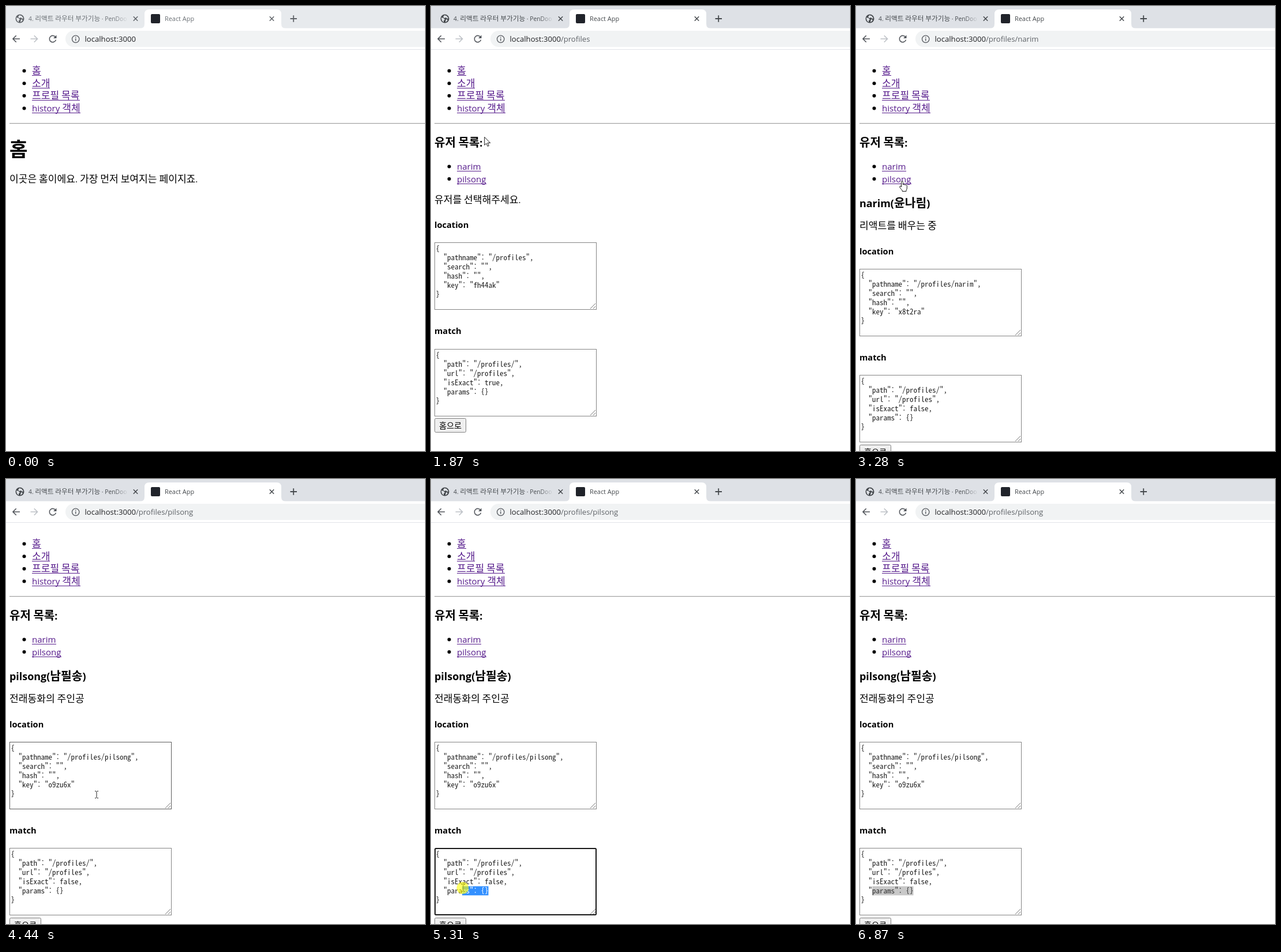
An HTML page for the animation above (6.95 s loop, 726 px wide and 772 px high).

```html
<!DOCTYPE html>
<html lang="ko">
<head>
<meta charset="utf-8">
<title>React App</title>
<style>
  html, body { margin: 0; width: 100%; height: 100%; overflow: hidden; background: #fff; }
  svg { display: block; width: 100%; height: 100%; }
  text { font-family: "Open Sans", "Noto Sans CJK KR", "Noto Sans", sans-serif; white-space: pre; }
  .mono { font-family: "Noto Sans Mono CJK KR", "Noto Sans Mono", "Liberation Mono", monospace; }
  .line { fill: none; }
</style>
</head>
<body>
<svg id="stage" viewBox="0 0 726 772" xmlns="http://www.w3.org/2000/svg">
  <g id="frame"></g>
  <g id="page"></g>
  <g id="pointer"></g>
</svg>
<script>
const LOOP = 6950;
const SANS = '"Open Sans", "Noto Sans CJK KR", "Noto Sans", sans-serif';
const MONO = '"Noto Sans Mono CJK KR", "Noto Sans Mono", "Liberation Mono", monospace';
const LATIN = 0.88;         // Latin letters run smaller than Hangul
const CELL = 6.5, ROW = 15.8;
const VISITED = '#551a8b';

const ruler = document.createElement('canvas').getContext('2d');
function measure(str, size, family) {
  ruler.font = `${size}px ${family}`;
  return ruler.measureText(str).width;
}
const monoSize = 13 * CELL / measure('0', 13, MONO);

// --- drawing helpers -------------------------------------------------
const runs = (str, size) => str.split(/([\uac00-\ud7a3]+)/).filter(Boolean).map(s => {
  const hangul = /[\uac00-\ud7a3]/.test(s);
  return { s, hangul, size: hangul ? size : size * LATIN };
});
const widthOf = (str, size) =>
  runs(str, size).reduce((sum, r) => sum + measure(r.s, r.size, SANS), 0);

function text(x, y, str, size = 17.1, fill = '#000', weight = 400) {
  // regular Hangul is drawn a little lighter than the Latin beside it
  const spans = runs(str, size).map(r => {
    const w = r.hangul && weight === 400 ? 350 : weight;
    return `<tspan font-size="${r.size}" font-weight="${w}">${r.s}</tspan>`;
  }).join('');
  return `<text x="${x}" y="${y}" fill="${fill}">${spans}</text>`;
}
const bold = (x, y, str, size) => text(x, y, str, size, '#000', 700);
const rect = (x, y, w, h, fill, extra = '') =>
  `<rect x="${x}" y="${y}" width="${w}" height="${h}" fill="${fill}" ${extra}/>`;
const path = (d, stroke, width = 1.5) =>
  `<path class="line" d="${d}" stroke="${stroke}" stroke-width="${width}"/>`;

function linkItem(y, str, pressed) {
  const color = pressed ? '#f00' : VISITED;
  return `<circle cx="31.5" cy="${y - 5.5}" r="3"/>` + text(45, y, str, 17.1, color) +
    rect(45, Math.round(y + 2), Math.round(widthOf(str, 17.1)), 1, color);
}

function mono(col, row, top, str, fill = '#222') {
  return `<text class="mono" x="${8.5 + col * CELL}" y="${top + 15 + row * ROW}" ` +
    `font-size="${monoSize}" fill="${fill}">${str}</text>`;
}

function textarea(top, lines, { focused, hovered }) {
  const border = focused
    ? rect(7, top + .5, 279, 115, '#fff', 'stroke="#181818" stroke-width="2" rx="1.5"')
    : rect(6.5, top, 280, 116, '#fff', `stroke="${hovered ? '#5c5c5c' : '#858585'}"`);
  return border + path(`M276 ${top + 114.5}l9-9M281 ${top + 114.5}l4-4`, '#777', 1) +
    lines.map((s, i) => mono(0, i, top, s)).join('');
}

// --- browser window --------------------------------------------------
function browser(active, route) {
  const strip = active ? '#dee1e6' : '#e7eaed';
  const title = active ? '#45494d' : '#6b7075';
  const icon = active ? '#45494d' : '#5f6368';
  const cross = x => path(`M${x - 3.7} 18.3l7.4 7.4m0-7.4l-7.4 7.4`, icon);
  const host = 'localhost:3000';
  return `<defs><linearGradient id="fade">
      <stop stop-color="${strip}" stop-opacity="0"/><stop offset="1" stop-color="${strip}"/>
    </linearGradient></defs>` +
    rect(0, 0, 726, 39, strip) +
    '<path fill="#fff" d="M232 39q8 0 8-8V14q0-8 8-8H469q8 0 8 8V31q0 8 8 8z"/>' +
    rect(0, 38.5, 726, 37, '#fff') +
    `<circle cx="24" cy="22" r="7.5" fill="${icon}"/>` +
    `<path fill="${strip}" d="M18 20l4 1 2 3-2 1v3q-4-2-4-8zM23 16l4 1 3 4-2 1-2-2-3 1-2-2zM26 23l3 1-2 3-2 1z"/>` +
    text(39, 26, '4. 리액트 라우터 부가기능 · PenDoo', 11.7, title) +
    rect(188, 10, 24, 24, 'url(#fade)') + rect(211.5, 10, 6, 24, strip) + cross(224.5) +
    rect(251, 14, 16, 16, '#20232a', 'rx="2"') +
    text(275, 26, 'React App', 12.4, title) + cross(460.5) +
    path('M492.5 22h11.5M498.2 16.2v11.5', icon, 1.8) +
    path('M24 57H12m5.7-5.7L12 57l5.7 5.7', '#50545a', 1.6) +
    path('M42.5 57h12m-5.7-5.7l5.7 5.7-5.7 5.7', '#bdc1c6', 1.6) +
    path('M86 54.3a5.7 5.7 0 1 0 .5 4.3', '#50545a', 1.6) +
    '<path fill="#50545a" d="M87.5 50.5v5.5h-5.5z"/>' +
    rect(103, 43, 640, 28, '#f1f3f4', 'rx="14"') +
    '<circle class="line" cx="120.7" cy="57.3" r="6.2" stroke="#5f6368" stroke-width="1.4"/>' +
    path('M120.7 56.3v4.2M120.7 53.5v1.6', '#5f6368') +
    text(136.5, 62, host, 14.9, '#202124') +
    text(136.5 + widthOf(host, 14.9), 62, route, 14.9, '#5f6368') +
    rect(0, 75, 726, 1, '#e1e4e8');
}

// --- pages -----------------------------------------------------------
const pages = [
  { from: 0, route: '' },
  { from: 1630, route: '/profiles', key: 'fh44ak' },
  { from: 2960, route: '/profiles/narim', key: 'x8t2ra', name: 'narim(윤나림)', about: '리액트를 배우는 중' },
  { from: 4210, route: '/profiles/pilsong', key: 'o9zu6x', name: 'pilsong(남필송)', about: '전래동화의 주인공' },
];

function selection(top, col, blurred) {
  const x = 8.5 + col * CELL;
  const chosen = '  "params": {}'.slice(col);
  return rect(x, top + 66, 14 * CELL + 8.5 - x, ROW, blurred ? '#c8c8c8' : '#3390ff') +
    mono(col, 4, top, chosen, blurred ? '#323232' : '#fff');
}

function pageBody(page, s) {
  const nav = ['홈', '소개', '프로필 목록', 'history 객체']
    .map((label, i) => linkItem(118 + i * 21.67, label, s.pressed === label)).join('');
  const top = nav + rect(6, 203, 720, 1, '#a4a4a4') + rect(6, 204, 720, 1, '#e8e8e8');
  if (!page.key)
    return top + bold(6, 260.5, '홈', 34.2) + text(6, 306, '이곳은 홈이에요. 가장 먼저 보여지는 페이지죠.');

  const dy = page.name ? 46 : 0;
  const locationTop = 410.5 + dy;
  const matchTop = page.name ? 640.5 : 595.5;
  const detail = page.name
    ? bold(6, 348.5, page.name, 20.4) + text(6, 387, page.about)
    : text(6, 342, '유저를 선택해주세요.');
  return top + bold(6, 243.5, '유저 목록:', 20) +
    linkItem(284, 'narim', s.pressed === 'narim') +
    linkItem(305.5, 'pilsong', s.pressed === 'pilsong') + detail +
    bold(6, 384.5 + dy, 'location', 16.6) +
    textarea(locationTop, ['{', `  "pathname": "${page.route}",`, '  "search": "",',
      '  "hash": "",', `  "key": "${page.key}"`, '}'], { hovered: s.hover === 'location' }) +
    bold(6, 569 + dy, 'match', 16.6) +
    textarea(matchTop, ['{', '  "path": "/profiles/",', '  "url": "/profiles",',
      `  "isExact": ${!page.name},`, '  "params": {}', '}'],
      { focused: s.focused, hovered: s.hover === 'match' }) +
    (s.col < 14 ? selection(matchTop, s.col, s.blurred) : '') +
    rect(6.5, 715.5 + dy, 54, 24, '#efefef', 'stroke="#808080" rx="2"') +
    text(14, 733 + dy, '홈으로', 14.2);
}

// --- pointer ---------------------------------------------------------
const start = [460, 775];
// [first step, last step, number of steps, x, y]
const moves = [
  [70, 620, 8, 58, 127],
  [850, 1170, 5, 69, 157],
  [1790, 1950, 3, 101, 252],
  [2190, 2500, 5, 75, 283],
  [3040, 3280, 4, 80, 304],
  [4280, 4440, 3, 156, 547.5],
  [4520, 4820, 5, 107, 715],
  [5140, 5460, 5, 26.5, 706.5],
  [6010, 6320, 5, 425, 775],
];
const presses = [
  [1560, 1630, '프로필 목록'], [2880, 2960, 'narim'], [4130, 4210, 'pilsong'], [4900, 5930, 'match'],
];
const smooth = p => p * p * (3 - 2 * p);

function pointerAt(t) {
  let [x, y] = start;
  for (const [t0, t1, n, toX, toY] of moves) {
    if (t < t0) break;
    const step = Math.min(n, 1 + Math.floor((t - t0 + 4) / (t1 - t0) * (n - 1)));
    const p = smooth(step / n);
    x += (toX - x) * p;
    y += (toY - y) * p;
  }
  return { x, y };
}

const shapes = {
  arrow: '<path d="M0 0V14l3.2-3 2.2 5 2.2-1-2.2-4.8H10z" fill="#fff" stroke="#000" stroke-width=".9"/>',
  hand: '<path d="M-1.5 10V1.3a1.4 1.4 0 0 1 2.8 0V6a1.3 1.3 0 0 1 2.4 .4a1.3 1.3 0 0 1 2.4 .5' +
    'a1.2 1.2 0 0 1 2.2 .8V12q0 2-1.3 3.6V17.5H.2V16q-2.5-2.5-4.6-6a1.3 1.3 0 0 1 2.2-1.2z" ' +
    'fill="#fff" stroke="#000" stroke-width=".9"/>',
  beam: path('M-2-6h2l1 1 1-1h2M1-5V5M-2 6h2l1-1 1 1h2', '#222', 1),
};

function hoverAt({ x, y }, page) {
  const within = (x0, y0, x1, y1) => x >= x0 && x <= x1 && y >= y0 && y <= y1;
  if (within(45, 104, 128, 188)) return 'link';
  if (page.key && within(45, 268, 99, 311)) return 'link';
  if (page.name && within(6, 456, 287, 573)) return 'location';
  if (page.name && within(6, 640, 287, 757)) return 'match';
  return 'blank';
}

function pointer(pos, hover, pressed) {
  const shape = { link: 'hand', location: 'beam', match: 'beam', blank: 'arrow' }[hover];
  const ring = pressed ? '<circle r="10.5" fill="#ff0" opacity=".6"/>' : '';
  return `<g transform="translate(${pos.x} ${pos.y})">${shapes[shape]}${ring}</g>`;
}

// --- playback --------------------------------------------------------
const shown = {};
function put(id, markup) {
  if (shown[id] === markup) return;
  shown[id] = markup;
  document.getElementById(id).innerHTML = markup;
}

function draw(t) {
  const page = pages.filter(p => t >= p.from).pop();
  const press = presses.find(([a, b]) => t >= a && t < b);
  const pos = pointerAt(t);
  const hover = hoverAt(pos, page);
  const dragX = t < 5460 ? pos.x : 26.5;
  const state = {
    hover,
    pressed: press && press[2],
    focused: t >= 4900 && t < 6870,
    blurred: t >= 6870,
    col: t < 5140 ? 14 : Math.max(3, Math.min(14, Math.round((dragX - 8.5) / CELL))),
  };
  put('frame', browser(t >= 1560, page.route));
  put('page', pageBody(page, state));
  put('pointer', pointer(pos, hover, press));
}

const begin = performance.now();
function tick() {
  draw((performance.now() - begin) % LOOP);
  requestAnimationFrame(tick);
}
tick();
</script>
</body>
</html>
```
